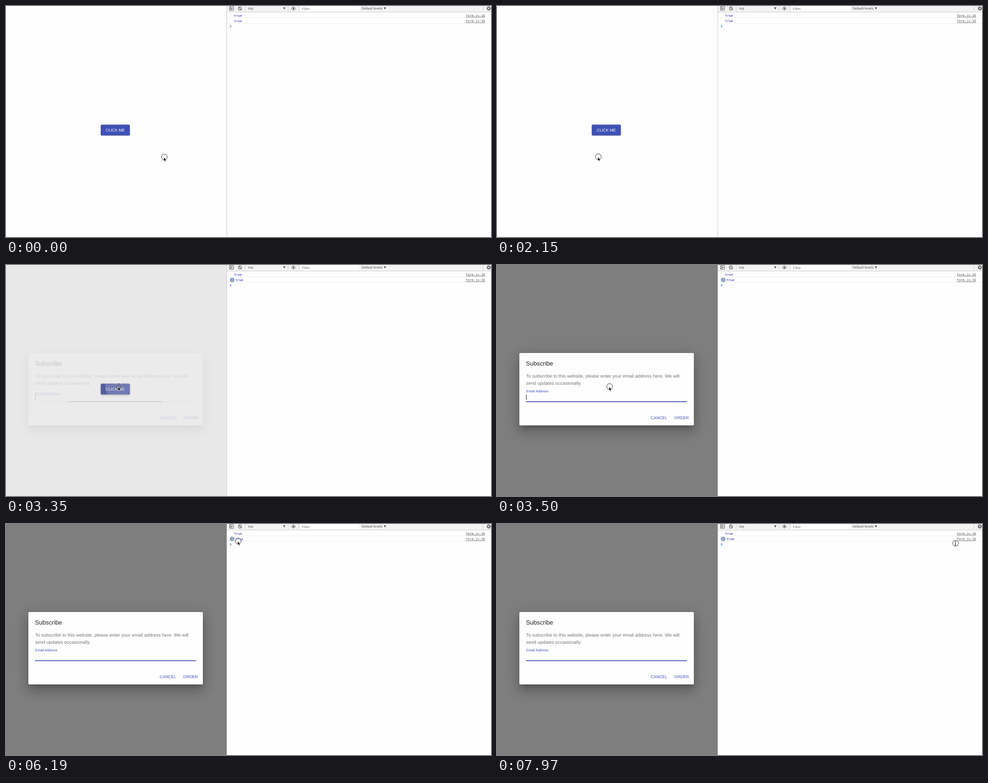
Write an HTML page that moves like this. It is 1084x517 px and loops after 8000 ms.

```html
<!DOCTYPE html>
<html lang="en">
<head>
<meta charset="utf-8">
<title>Subscribe dialog</title>
<style>
  html, body { margin: 0; width: 100%; height: 100%; overflow: hidden; background: #fefefe; }
  #stage { position: relative; width: 1084px; height: 517px; overflow: hidden; }
  #stage div, svg { position: absolute; left: 0; top: 0; }
  text { font-family: "Liberation Sans", Arial, sans-serif; text-rendering: geometricPrecision; white-space: pre; }
  #page { width: 493px; height: 517px; overflow: hidden; border-right: 1px solid #cacaca; }
  #button {
    width: 65px; height: 24px; border-radius: 2.6px; transform: translate(211.8px, 265.5px);
    background: #3f51b5;
    box-shadow: 0 2px .7px -1.3px rgba(0,0,0,.2), 0 1.3px 1.3px rgba(0,0,0,.14), 0 .7px 3.3px rgba(0,0,0,.12);
  }
  #button.hover {
    background: #303f9f;
    box-shadow: 0 1.3px 2.6px -.7px rgba(0,0,0,.2), 0 2.6px 3.3px rgba(0,0,0,.14), 0 .7px 6.5px rgba(0,0,0,.12);
  }
  #clip { width: 65px; height: 24px; overflow: hidden; border-radius: 2.6px; }
  #clip #ripple { left: 10px; top: -23px; width: 58px; height: 58px; border-radius: 50%; background: #fff; opacity: .2; }
  #backdrop { width: 493px; height: 517px; background: rgba(0, 0, 0, .5); }
  #dialog { width: 493px; height: 517px; }
  #dialog #paper {
    left: 50px; top: 197px; width: 390px; height: 162px; border-radius: 2.6px; background: #fefefe;
    box-shadow: 0 7px 10px -4.5px rgba(0,0,0,.2), 0 15.6px 24.7px 2px rgba(0,0,0,.14), 0 6px 30px 5px rgba(0,0,0,.12);
  }
  .small { font-size: 9.1px; }
  .body { font-size: 10.4px; fill: #757575; }
  .bar { font-size: 7.8px; fill: #555; }
  .mono, .link { font: 7.15px "DejaVu Sans Mono", Menlo, monospace; fill: #1a1aa6; }
  .link { fill: #545454; text-decoration: underline; }
  .blue { fill: #3f51b5; }
</style>
</head>
<body>
<div id="stage">
  <div id="page">
    <div id="button"><div id="clip"><div id="ripple"></div></div></div>
    <svg width="493" height="517"><text class="small" x="222.7" y="281" fill="#fff">CLICK ME</text></svg>
    <div id="backdrop"></div>
    <div id="dialog">
      <div id="paper"></div>
      <svg width="493" height="517">
        <text x="64.8" y="224.6" font-size="13.65" fill="#222">Subscribe</text>
        <text class="body" x="65" y="252.2">To subscribe to this website, please enter your email address here. We will</text>
        <text class="body" x="65" y="268">send updates occasionally.</text>
        <text id="label" class="blue" x="65">Email Address</text>
        <path d="M65 306H424.5" stroke="#949494" stroke-width=".7"/>
        <path id="focus" stroke="#3f51b5" stroke-width="1.6"/>
        <rect id="caret" x="65" y="290" width="1" height="12" fill="#111"/>
        <text class="small blue" x="343.6" y="345.3">CANCEL</text>
        <text class="small blue" x="396.1" y="345.3">ORDER</text>
      </svg>
    </div>
  </div>

  <svg width="1084" height="517">
    <rect x="494" width="590" height="13" fill="#f3f3f3"/>
    <path d="M494 13.5H1084" stroke="#cdcdcd"/>
    <path d="M534.5 0V11M630.5 0V11M654.5 0V11M1066.5 0V11" stroke="#ccc"/>
    <rect x="658" width="132" height="12" fill="#fff"/>
    <g fill="none" stroke="#5a5a5a">
      <path d="M499.5 1.5H508.5V9.5H499.5ZM501.7 1.5V9.5"/>
      <circle cx="523" cy="5.6" r="3.7" stroke-width="1.2"/>
      <path d="M520.4 3L525.6 8.2" stroke-width="1.2"/>
      <path d="M637.4 5.6Q642.5 -1.2 647.6 5.6Q642.5 12.4 637.4 5.6Z"/>
      <circle cx="1079" cy="5.6" r="2.6" stroke-width="1.7"/>
      <circle cx="1079" cy="5.6" r="4.2" stroke-width="1.4" stroke-dasharray="1.7 1.6"/>
    </g>
    <path d="M503.4 3.4V7.7L507 5.5ZM619.2 3H624.6L621.9 8ZM844.2 3H849.6L846.9 8Z" fill="#5a5a5a"/>
    <circle cx="642.5" cy="5.6" r="1.9" fill="#5a5a5a"/>
    <text class="bar" x="541" y="8.2" letter-spacing=".4">top</text>
    <text class="bar" x="661.5" y="8.5" style="fill:#757575">Filter</text>
    <text class="bar" x="794.7" y="8.2">Default levels</text>
    <path d="M494 26.5H1084M494 38.5H1084" stroke="#f0f0f0"/>
    <text class="mono" x="510" y="23.6">true</text>
    <text id="last" class="mono" y="36">true</text>
    <text class="link" x="1027.5" y="23.6">form.js:16</text>
    <text class="link" x="1027.5" y="36">form.js:16</text>
    <g id="badge">
      <circle cx="505.5" cy="33.4" r="5" fill="#8097bd"/>
      <text x="505.5" y="36" font-size="7.2" fill="#fff" text-anchor="middle">2</text>
    </g>
    <path d="M500.6 43L503.1 45.5L500.6 48" fill="none" stroke="#367cf1" stroke-width="1.1"/>

    <g id="cursor" fill="none">
      <circle r="6.8" stroke="#fff" stroke-width="1.8" opacity=".7"/>
      <circle r="6.5" stroke="#111" stroke-width=".9"/>
      <path id="arrow" d="M-1.3 .7v8.6l2-1.8l1.3 3.1l1.6-.7l-1.3-3h2.6z" fill="#000" stroke="#fff" stroke-width=".7"/>
      <path id="beam" d="M-2.2 -3.6Q-.4 -3.6 -.4 -2.4V3.4Q-.4 4.6 -2.2 4.6M1.4 -3.6Q-.4 -3.6 -.4 -2.4M-.4 3.4Q-.4 4.6 1.4 4.6M-1.4 1.6H.6" stroke="#111"/>
    </g>
  </svg>
</div>

<script>
const LOOP = 8000, STEP = 150, BLINK = 500;
const HOVER = 2600, OPEN = 3350, OPENED = 3500, FOCUS = 3280, CONSOLE = 7080;

const restarts = [0, 140, 800, 2000, 3200, 3830, 4280, 4860, 5890, 7080, 7830, 7970];

// Pointer stops: time, x, y
const stops = [
  [0, 354, 338], [800, 212, 425], [950, 215, 414.5], [1550, 214, 370], [1850, 214, 370],
  [2750, 251.7, 272], [4130, 251.7, 272], [5310, 485, 126], [6190, 519, 38],
  [6490, 539, 36], [6790, 524, 38], [6950, 524, 38], [7530, 959, 41], [7970, 1025, 43]
];

const $ = id => document.getElementById(id);
const show = (id, on) => { $(id).style.visibility = on ? 'visible' : 'hidden'; };

function sampleTime(now) {
  const start = restarts.findLast(t => t <= now);
  return start + STEP * Math.floor((now - start) / STEP);
}

function pointer(time) {
  const i = stops.findLastIndex(s => s[0] <= time);
  const [t0, x0, y0] = stops[i];
  const [t1, x1, y1] = stops[i + 1] || [LOOP, x0, y0];
  const k = (time - t0) / (t1 - t0);
  return [x0 + (x1 - x0) * k, y0 + (y1 - y0) * k];
}

function draw(time) {
  const open = time >= OPEN;
  const opening = open && time < OPENED;

  $('button').classList.toggle('hover', time >= HOVER);
  show('ripple', open);

  $('backdrop').style.opacity = $('dialog').style.opacity = opening ? .175 : +open;
  $('label').setAttribute('y', opening ? 291 : 285);
  $('label').setAttribute('font-size', opening ? 8.9 : 7.8);
  const half = opening ? 104 : 179.7;
  $('focus').setAttribute('d', `M${244.8 - half} 305.9h${2 * half}`);
  show('caret', open && Math.floor((time - FOCUS) / BLINK) % 2 === 0);

  show('badge', open);
  $('last').setAttribute('x', open ? 513 : 510);

  show('arrow', time < CONSOLE);
  show('beam', time >= CONSOLE);
  $('cursor').setAttribute('transform', `translate(${pointer(time)})`);
}

function tick() {
  draw(sampleTime(performance.now() % LOOP));
  requestAnimationFrame(tick);
}
tick();
</script>
</body>
</html>
```
